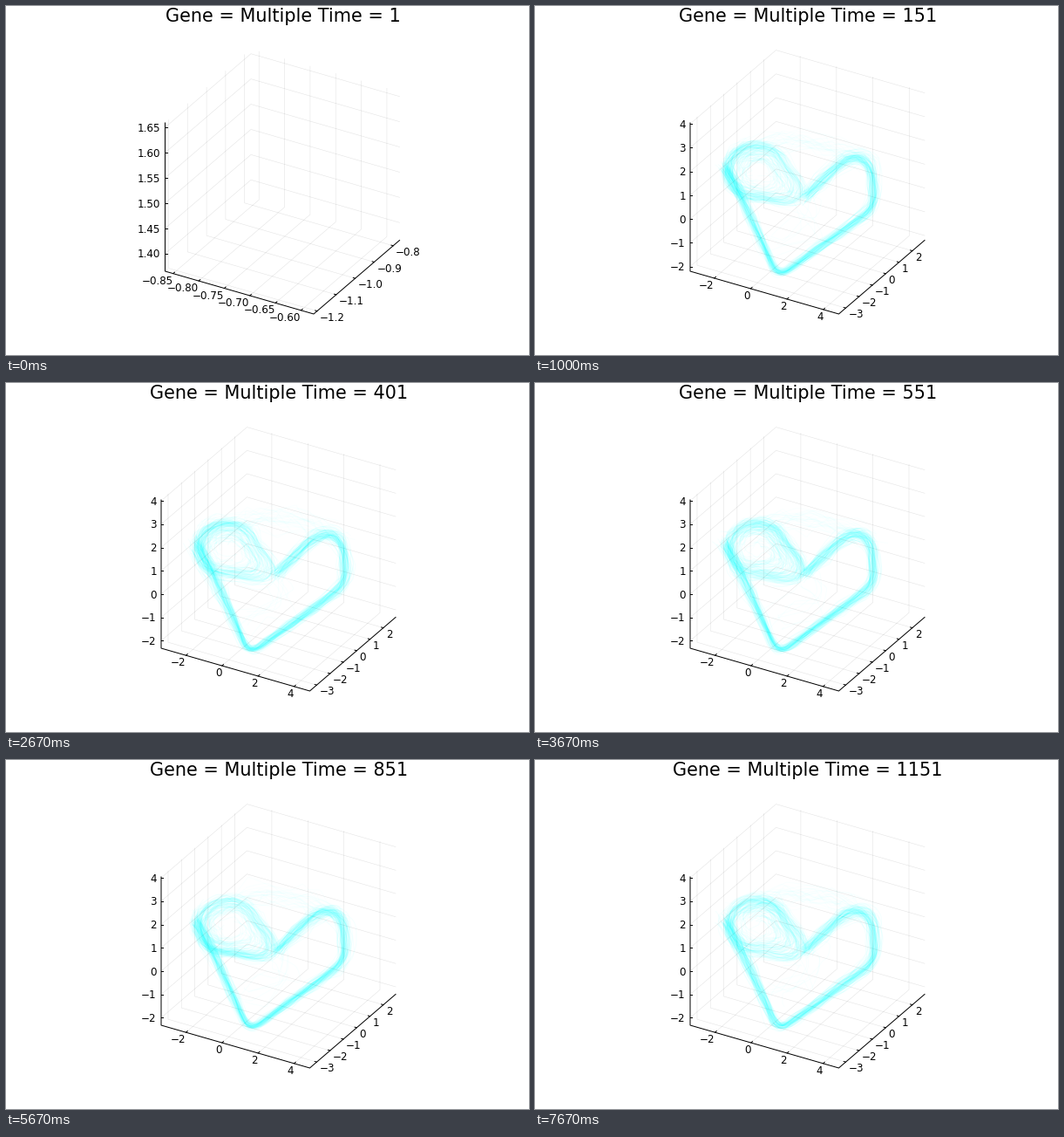
A matplotlib script for the animation above (8000 ms loop, 600 by 400 pixels).

```python
import numpy as np
import matplotlib.pyplot as plt
from matplotlib.animation import FuncAnimation
from matplotlib.collections import LineCollection

FRAMES, LOOP_MS, STEP = 24, 8000, 50
DPI = 100
PX = 72 / DPI  # points per pixel
plt.rcParams["font.family"] = "DejaVu Sans"

fig = plt.figure(figsize=(6, 4), dpi=DPI, facecolor="white")
ax = fig.add_axes([0, 0, 1, 1])

# Screen vectors of the box edges
X_EDGE = np.array([170.5, 49.0])
Y_EDGE = np.array([98.5, -84.5])
Z_EDGE = np.array([0.0, -170.0])

HEART = [(217, 180), (243, 232), (279, 311), (390, 231),
         (387, 180), (368, 169), (348, 182), (307, 222)]
INNER = [(270, 200), (315, 225), (320, 250), (268, 272)]


def rounded(corners, count=120, reach=4):
    """Even samples along a polyline, averaged to round its corners."""
    corners = np.array(corners, float)
    along = np.r_[0, np.cumsum(np.hypot(*np.diff(corners, axis=0).T))]
    t = np.linspace(0, along[-1], count)
    points = np.stack([np.interp(t, along, c) for c in corners.T], axis=1)
    padded = np.pad(points, ((reach, reach), (0, 0)), mode="edge")
    return sum(padded[i:i + count] for i in range(2 * reach + 1)) / (2 * reach + 1)


def wander(rng, count, samples, stations=14):
    """Random offsets that drift slowly along each path."""
    knots = rng.normal(size=(count, stations, 2))
    t = np.linspace(0, stations - 1, samples)
    i = np.minimum(t.astype(int), stations - 2)
    w = (t - i)[:, None]
    shared = rng.normal(size=(count, 1, 2))
    return 0.8 * (knots[:, i] * (1 - w) + knots[:, i + 1] * w) + 0.7 * shared


def draw_paths(paths, alpha):
    ax.add_collection(LineCollection(paths, colors="cyan", linewidths=PX,
                                     alpha=alpha))


def spirals(rng, count, samples=110):
    """Outward spirals in an ellipse that is drawn out to a tip."""
    t = np.linspace(0, 1, samples)
    size = 1 - 0.8 * rng.beta(1, 1.5, size=(count, 1))
    start = rng.uniform(0, 2 * np.pi) + rng.normal(size=(count, 1))
    angle = start + 2.6 * np.pi * t
    radius = size ** (1 - t)
    tip = np.maximum(np.cos(angle - 0.6), 0) ** 8
    radius = radius + 0.78 * tip * radius ** 2
    return np.stack([254 + 36 * radius * np.cos(angle),
                     190 + 32 * radius * np.sin(angle)], axis=2)


def draw_trajectories(frame):
    rng = np.random.default_rng(100 + frame)
    t = np.linspace(0, 1, 60)
    veil = np.stack([225 + 155 * t, 177 - 22 * np.sin(np.pi * t)], axis=1)
    draw_paths(veil + 7 * wander(rng, 24, len(t), 9), 0.02)
    inner = rounded(INNER, 60)
    draw_paths(inner + 10 * wander(rng, 7, len(inner), 6), 0.025)
    heart = rounded(HEART)
    spread = 2.4 + (310 - heart[:, 1:]) / 75
    draw_paths(heart + spread * wander(rng, 110, len(heart)), 0.038)
    lobes = spirals(rng, 85)
    draw_paths(lobes + 3.2 * wander(rng, len(lobes), lobes.shape[1]), 0.034)


def limits(frame):
    """Range, ticks and label format for x, y and z."""
    if frame == 0:
        return [((-0.8657, -0.5752), -0.85 + 0.05 * np.arange(6), "{:.2f}"),
                ((-1.2183, -0.7665), -1.2 + 0.1 * np.arange(5), "{:.1f}"),
                ((1.365, 1.659), 1.4 + 0.05 * np.arange(6), "{:.2f}")]
    grown = min(frame // 2, 3)  # the range widens in steps, then settles
    return [((-3.3 - 0.025 * grown, 4.84 + 0.01 * grown),
             np.arange(-2, 5, 2), "{:.0f}"),
            ((-3.52, 2.92), np.arange(-3, 3), "{:.0f}"),
            ((-2.14 - 0.06 * grown, 4.04), np.arange(-2, 5), "{:.0f}")]


def line(*points, color="black", width=1.0, **style):
    ax.plot(*np.array(points).T, color=color, lw=width * PX, **style)


def grid(*points):
    line(*points, alpha=0.1, width=0.6)


def label(text, pos, align):
    ax.text(pos[0], pos[1] + 4.4, text.replace("-", "\u2212"), ha=align,
            va="baseline", fontsize=11.9 * PX)


def draw_box(frame, left):
    front, right, back = left + X_EDGE, left + X_EDGE + Y_EDGE, left + Y_EDGE
    axes = limits(frame)
    fractions = [(ticks - lo) / (hi - lo) for (lo, hi), ticks, _ in axes]
    for f in fractions[0]:
        grid(left + f * X_EDGE, back + f * X_EDGE, back + f * X_EDGE + Z_EDGE)
    for f in fractions[1]:
        grid(front + f * Y_EDGE, left + f * Y_EDGE, left + f * Y_EDGE + Z_EDGE)
    for f in fractions[2]:
        grid(*(corner + f * Z_EDGE for corner in (left, back, right)))

    if frame > 0:
        draw_trajectories(frame)

    line(left + Z_EDGE, left, front, right, solid_joinstyle="miter")
    sides = [(left, X_EDGE, Y_EDGE, (-0.3, 7.7), "right"),
             (front, Y_EDGE, -X_EDGE, (3, 6.7), "left"),
             (left, Z_EDGE, X_EDGE * (1, 0), (-5.2, 0.3), "right")]
    for (origin, edge, inward, shift, align), fs, (_, ticks, fmt) in zip(
            sides, fractions, axes):
        for f, value in zip(fs, ticks):
            tick = origin + f * edge
            line(tick, tick + 2.3 * inward / np.hypot(*inward))
            label(fmt.format(value), tick + shift, align)


def draw(frame):
    ax.clear()
    ax.set(xlim=(0, 600), ylim=(400, 0))
    ax.axis("off")
    left = np.array([182.5 if frame == 0 else 178.0, 304.0])
    draw_box(frame, left)
    ax.text(left[0] + 135, 18, f"Gene = Multiple Time = {1 + STEP * frame}",
            ha="center", va="baseline", fontsize=20.75 * PX)
    return []


anim = FuncAnimation(fig, draw, frames=FRAMES, init_func=lambda: [],
                     interval=LOOP_MS / FRAMES, repeat=True, repeat_delay=0)
plt.show()
```
